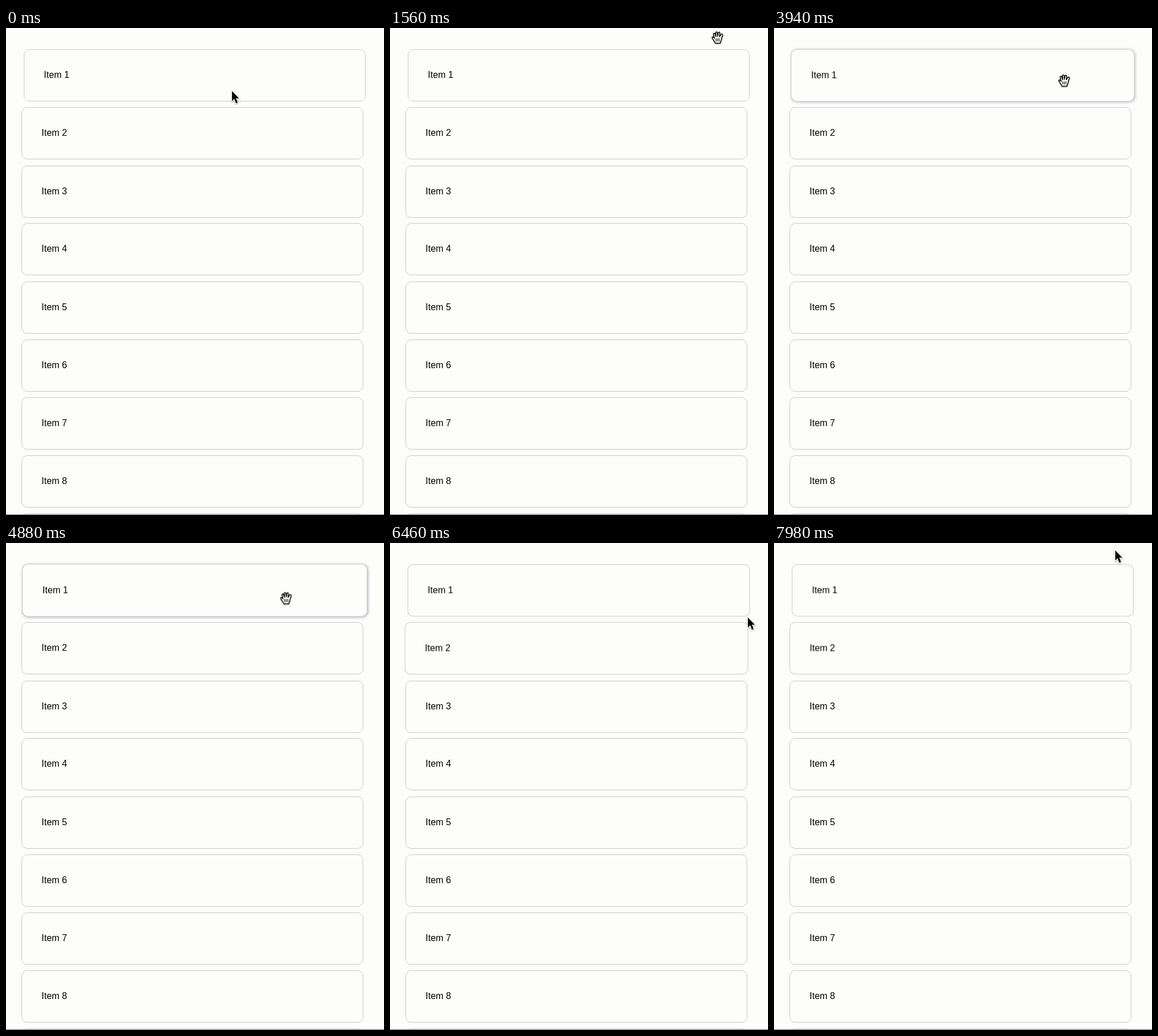
Write an HTML page that moves like this. It is 659x849 px and loops after 8 s.

```html
<!DOCTYPE html>
<html lang="en">
<head>
<meta charset="utf-8">
<title>Sortable list</title>
<style>
  html, body { margin: 0; width: 100%; height: 100%; overflow: hidden; background: #fdfdfc; }
  #stage { position: relative; width: 659px; height: 849px; overflow: hidden; }
  .card {
    position: absolute; left: 27px; width: 596px; height: 91px;
    box-sizing: border-box; padding-left: 34px;
    border: 1px solid #c9c9c9; border-radius: 10px; background: #fdfdfc;
    font: 16px/87px "Liberation Sans", Arial, sans-serif; color: #000;
  }
  .card:nth-child(1) { left: 31px; animation: grow1 8s linear infinite, shade1 8s linear infinite; }
  .card:nth-child(2) { animation: grow2 8s linear infinite, shade2 8s linear infinite; }
  #edge { position: absolute; left: 0; top: 848px; width: 659px; height: 1px; background: #666; }

  #cursor { position: absolute; left: 0; top: 0; overflow: visible; animation: travel 8s linear infinite; }
  #cursor g { filter: drop-shadow(0 1.5px 1.2px rgba(0, 0, 0, .35)); }
  #hand { animation: hand 8s step-end infinite; }
  #arrow { animation: arrow 8s step-end infinite; }

  @keyframes travel {
    0% { transform: translate(394px, 110px); }
    10.25% { transform: translate(520px, 36px); }
    17.5%, 38.75% { transform: translate(571px, 16px); }
    41.75% { transform: translate(563px, 37px); }
    49.25% { transform: translate(506px, 91px); }
    55% { transform: translate(491px, 95px); }
    66% { transform: translate(486px, 96px); }
    70% { transform: translate(489px, 118px); }
    71.5% { transform: translate(492px, 135px); }
    76% { transform: translate(560px, 163px); }
    80.75% { transform: translate(624px, 130px); }
    84% { transform: translate(619px, 108px); }
    89% { transform: translate(611px, 58px); }
    93% { transform: translate(601px, 24px); }
    99.75%, 100% { transform: translate(595px, 13px); }
  }
  @keyframes hand {
    0%, 71.1%, 80.4%, 91.5%, 100% { opacity: 0; }
    5%, 73%, 82% { opacity: 1; }
  }
  @keyframes arrow {
    0%, 71.1%, 80.4%, 91.5%, 100% { opacity: 1; }
    5%, 73%, 82% { opacity: 0; }
  }
  @keyframes grow1 {
    0%, 48%, 73.5%, 79.9%, 92.5%, 100% { transform: none; }
    50.5%, 71%, 84%, 90.5% { transform: scale(1.01); }
    80.75% { transform: scale(1.0015); }
  }
  @keyframes shade1 {
    0%, 48%, 71.6%, 81.5%, 91.5%, 100% { box-shadow: 1px 1px 5px rgba(70, 70, 100, 0); }
    49.5%, 70.6%, 83.5%, 90.5% { box-shadow: 1px 1px 5px rgba(70, 70, 100, .45); }
  }
  @keyframes grow2 {
    0%, 72.5%, 82%, 100% { transform: none; }
    75%, 79.8% { transform: scale(1.01); }
    80.75% { transform: scale(1.005); }
  }
  @keyframes shade2 {
    0%, 72.5%, 80.6%, 100% { box-shadow: 1px 1px 5px rgba(70, 70, 100, 0); }
    74%, 79.8% { box-shadow: 1px 1px 5px rgba(70, 70, 100, .45); }
  }
</style>
</head>
<body>
<div id="stage">
  <div id="list"></div>
  <div id="edge"></div>
  <svg id="cursor" width="1" height="1">
    <g id="hand">
      <path transform="translate(-10.5 -10.5)" fill="#fff" stroke="#000" stroke-width="1.5" stroke-linejoin="round"
        d="M6.6 21C6 18.8 4.5 17.2 3.4 15.4C2.5 13.8 .4 11.8 1.1 10.6C1.9 9.4 3.7 10.4 5.2 12.4
           L3.6 5.8C3.1 3.4 5.5 2.8 6.2 5L7.9 9.6L7.4 3.2C7.3 .5 10 .5 10.2 3L10.8 9
           L11.8 3.2C12.2 1 14.7 1.4 14.5 3.6L14 9.8L16.6 5.8C17.7 4.2 20 5.1 19.3 7.2
           L17.6 12.6C17.2 15.6 15.8 18 15.3 21Z"/>
      <path d="M-2.5 2v5.5M.2 2v5.5M2.9 2v5.5" stroke="#000" stroke-width="1.1"/>
    </g>
    <g id="arrow">
      <path d="M0 0V17.4L4 13.6L6.9 21.2L10 20L7 12.5H12.2Z" stroke="#fff" stroke-width="2.2" paint-order="stroke"/>
    </g>
  </svg>
</div>
<script>
  const tops = [37, 138, 240, 340, 442, 543, 644, 745, 846];
  const list = document.getElementById('list');
  tops.forEach((top, i) => {
    const card = document.createElement('div');
    card.className = 'card';
    card.style.top = top + 'px';
    card.textContent = 'Item ' + (i + 1);
    list.append(card);
  });
</script>
</body>
</html>
```
